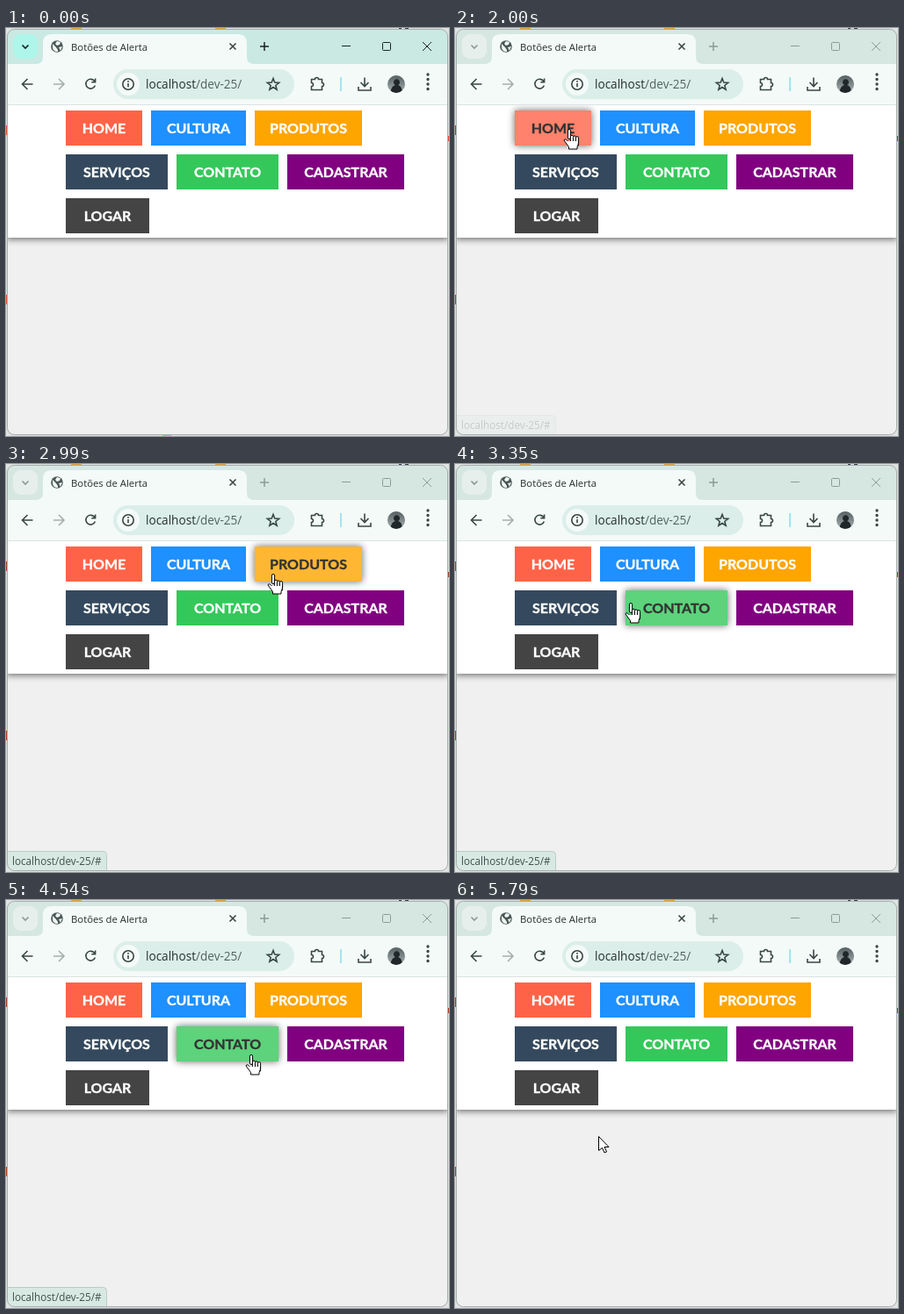
Recreate the animation shown at these times as an HTML page. Size 504 px wide and 465 px high, loop 6.32 s.

```html
<!DOCTYPE html>
<html lang="pt">
<head>
<meta charset="utf-8">
<title>Botões de Alerta</title>
<style>
html, body { margin: 0; width: 504px; height: 465px; overflow: hidden; background: #dfe3e2 }
svg { display: block; --f: 0 }
text { font-family: "Open Sans", "Noto Sans", sans-serif; fill: #26302e }
.btn text { font: bold 16px Lato, "Open Sans", sans-serif; text-anchor: middle; stroke-width: .35 }
.line { fill: none; stroke: #3a4744; stroke-width: 1.6 }
.faint { stroke: #a5b0ad }
.chrome { fill: none; stroke: color-mix(in srgb, #1b2422, #8d9a97 calc(var(--f) * 100%)) }
.strip { fill: color-mix(in srgb, #c9e9e2, #d6e7e2 calc(var(--f) * 100%)) }
.search { fill: color-mix(in srgb, #aef6ea, #e7efed calc(var(--f) * 100%)) }
.red { fill: color-mix(in srgb, #f0503c, #b04426 calc(var(--f) * 100%)) }
.cyan { fill: #5ad5e2; opacity: calc(1 - var(--f)) }
.cursor { fill: #fff; stroke: #000; stroke-linejoin: round }
</style>
</head>
<body>
<svg id="stage" width="504" height="465">
  <defs>
    <clipPath id="win"><rect x="1.5" y="1.5" width="501" height="462" rx="8"/></clipPath>
    <clipPath id="face"><circle cx="444" cy="64" r="10"/></clipPath>
    <filter id="blur" x="-30%" y="-50%" width="160%" height="200%"><feGaussianBlur stdDeviation="4.5"/></filter>
    <linearGradient id="photo" x2="0" y2="1"><stop stop-color="#555f62"/><stop offset="1" stop-color="#a9b2b3"/></linearGradient>
  </defs>

  <!-- desktop showing around the window -->
  <path fill="#e9a13b" d="M74 0h12v1H74zM238 0h12v1h-12z"/>
  <path fill="#33424f" d="M447 0h3v1h-3zM454 0h4v1h-4z"/>
  <path class="red" d="M0 111h2v11H0zM0 304h2v11H0zM502 123h2v6h-2z"/>
  <path class="cyan" d="M178 463h10v2h-10z"/>

  <g clip-path="url(#win)">
    <!-- page -->
    <path fill="#f0f0f0" d="M0 88h504v377H0z"/>
    <path opacity=".65" filter="url(#blur)" d="M0 88h504v152H0z"/>
    <path fill="#fff" d="M0 88h504v151H0z"/>
    <g id="nav"></g>

    <!-- tab strip -->
    <path class="strip" d="M0 0h504v48H0z"/>
    <path fill="#f3faf8" d="M0 41H34Q42 41 42 33V17Q42 7 52 7H264Q274 7 274 17V33Q274 41 282 41H504V87H0z"/>
    <path fill="#dbe4e2" d="M0 87h504v1H0z"/>
    <rect class="search" x="8" y="7" width="28" height="28" rx="9"/>
    <path class="chrome" stroke-width="1.7" d="M18.5 19.5l3.500 3.500 3.500-3.500"/>
    <path class="chrome" stroke-width="1.5" d="M289 21h10M294 16v10"/>
    <path class="chrome" d="M382 20.5h10M474 16l10 10M484 16l-10 10"/>
    <rect class="chrome" x="428.5" y="16.5" width="9" height="9" rx="1"/>
    <circle cx="58" cy="21" r="6.8" fill="#4a5754"/>
    <path fill="#eef6f4" d="M53 18l4 4 2 3v2q-6 0-6-6zM58 15l4 1-1 3-3 1-2-2zM60 22l4-1-2 5z"/>
    <text x="74" y="26" font-size="11.3">Botões de Alerta</text>
    <path class="line" d="M254.5 17.5l7 7M261.5 17.5l-7 7"/>

    <!-- toolbar -->
    <g class="line">
      <path d="M30.5 64H19M24.5 58L18.5 64l6 6"/>
      <path class="faint" d="M54 64h11.5M60 58l6 6-6 6"/>
      <path d="M101 61A5.4 5.4 0 1 0 101.4 65.500M101.6 57.5v4.300h-4.300"/>
      <rect x="122" y="47" width="206" height="34" rx="17" fill="#dbeee9" stroke="none"/>
      <circle cx="139" cy="64" r="13" fill="#f3faf8" stroke="none"/>
      <circle cx="139" cy="64" r="6.2"/>
      <path d="M139 63v4.300M139 60v1.700"/>
      <polygon id="star"/>
      <path d="M347.5 58.5h4a2 2 0 0 1 4 0h4v4a2 2 0 0 1 0 4v4h-12v-4a2 2 0 0 0 0-4z"/>
      <path d="M408 56.5v10M403.500 62l4.500 4.500 4.500-4.500M401 67v4h14v-4"/>
      <path stroke-width="3.4" stroke-linecap="round" stroke-dasharray="0 5.5" d="M480 53v17"/>
    </g>
    <path stroke="#a6e4ee" stroke-width="2" d="M381 56v16"/>
    <text x="159" y="69" font-size="13.6">localhost<tspan fill="#55625f" style="fill:#55625f">/dev-25/</tspan></text>
    <g clip-path="url(#face)">
      <path fill="url(#photo)" d="M434 54h20v20h-20z"/>
      <path fill="#20272a" d="M437 75q1-9 6-10a3.500 3.500 0 1 1 3 0q5 1 5 10z"/>
    </g>

    <g id="status">
      <path fill="#d8e9e4" stroke="#bccbc7" d="M1.5 464V441.5h109q4 0 4 4V464z"/>
      <text x="7" y="457" font-size="11.7" style="fill:#41504c">localhost/dev-25/#</text>
    </g>
  </g>
  <rect x="1.5" y="1.5" width="501" height="462" rx="8" fill="none" stroke="#a3abaa"/>

  <path id="arrow" class="cursor" d="M.5.5v16l4-3 2.500 5.500 2.500-1-2.500-5.500h5z"/>
  <g id="hand" class="cursor"></g>
</svg>
<script>
const LOOP = 6320, FADE = 120, SAMPLES = 12;
const LEFT = 68, TOP = 94, RIGHT = 460, HEIGHT = 40, GAP = 10;
const $ = id => document.getElementById(id);
const range = n => [...Array(n).keys()];
const ramp = (t, a, b) => Math.max(0, Math.min(1, (t - a) / (b - a)));

// Turning points of the pointer: time, x, y
const stops = [
  [1110, 389, 343], [1450, 172, 245], [1800, 130, 115], [2000, 130, 115], [2560, 249, 98],
  [2850, 345, 112], [3350, 200, 158], [3660, 142, 158], [4040, 314, 165], [4250, 355, 166],
  [4540, 279, 176], [4900, 150, 165], [5300, 158, 245], [5790, 163, 269]
];

function pointer(t) {
  if (t < stops[0][0]) return null;
  const i = stops.findIndex(s => s[0] > t);
  const b = stops.at(i), a = i < 0 ? b : stops[i - 1];
  const k = i < 0 ? 0 : ramp(t, a[0], b[0]);
  return [1, 2].map(j => a[j] + (b[j] - a[j]) * k);
}

// Buttons flow from left to right and wrap like a menu.
let x = LEFT, y = TOP;
const buttons = [
  ["HOME", 87, "#ff6347"], ["CULTURA", 108, "#1e90ff"], ["PRODUTOS", 122, "#ffa500"],
  ["SERVIÇOS", 116, "#34495e"], ["CONTATO", 116, "#34c85a"], ["CADASTRAR", 133, "#800080"],
  ["LOGAR", 95, "#444"]
].map(([label, w, color]) => {
  if (x + w > RIGHT) {
    x = LEFT;
    y += HEIGHT + GAP;
  }
  const g = document.createElementNS("http://www.w3.org/2000/svg", "g");
  const box = `x="${x}" y="${y}" width="${w}" height="${HEIGHT}"`;
  g.setAttribute("class", "btn");
  g.innerHTML = `<rect ${box} filter="url(#blur)"/><rect ${box} fill="${color}"/>
    <rect ${box} fill="#fff"/><text x="${x + w / 2}" y="${y + 26}">${label}</text>`;
  $("nav").append(g);
  const [shadow, , glow, text] = g.children;
  const button = { x, y, w, shadow, glow, text };
  x += w + GAP;
  return button;
});

const hits = (b, p) => p && p[0] >= b.x && p[0] < b.x + b.w && p[1] >= b.y && p[1] < b.y + HEIGHT;

$("star").setAttribute("points", range(10).map(i => {
  const r = i % 2 ? 3 : 7, a = i * Math.PI / 5;
  return [304 + r * Math.sin(a), 64.5 - r * Math.cos(a)];
}).join(" "));

$("hand").innerHTML = range(4).map(i =>
  `<rect x="${3 * i - 1.6}" y="${i ? 6.5 + i * .7 : .5}" width="3.2" height="11" rx="1.6"/>`
).join("") + `<path d="M-1.6 14Q-5 10-6 13L-.5 20.5V23H9V20.5Q10.6 18 10.6 14"/>`;

function draw(t) {
  $("stage").style.setProperty("--f", ramp(t, 100, 520));

  // Hover strength is the share of the last FADE ms spent over the button.
  const recent = range(SAMPLES).map(i => pointer(t - i * FADE / SAMPLES));
  for (const b of buttons) {
    const k = recent.filter(p => hits(b, p)).length / SAMPLES;
    const c = 255 - 204 * k;
    b.shadow.setAttribute("opacity", .6 * k);
    b.glow.setAttribute("opacity", .2 * k);
    b.text.style.fill = b.text.style.stroke = `rgb(${c},${c},${c})`;
  }

  const p = recent[0], over = buttons.some(b => hits(b, p));
  for (const [id, on] of [["arrow", p && !over], ["hand", over]]) {
    $(id).style.display = on ? "" : "none";
    if (on) $(id).setAttribute("transform", `translate(${p.map(Math.round)})`);
  }
  $("status").style.opacity = ramp(t, 1960, 2140) - ramp(t, 5500, 5700);
}

const begin = performance.now();
(function tick() {
  draw((performance.now() - begin) % LOOP);
  requestAnimationFrame(tick);
})();
</script>
</body>
</html>
```
